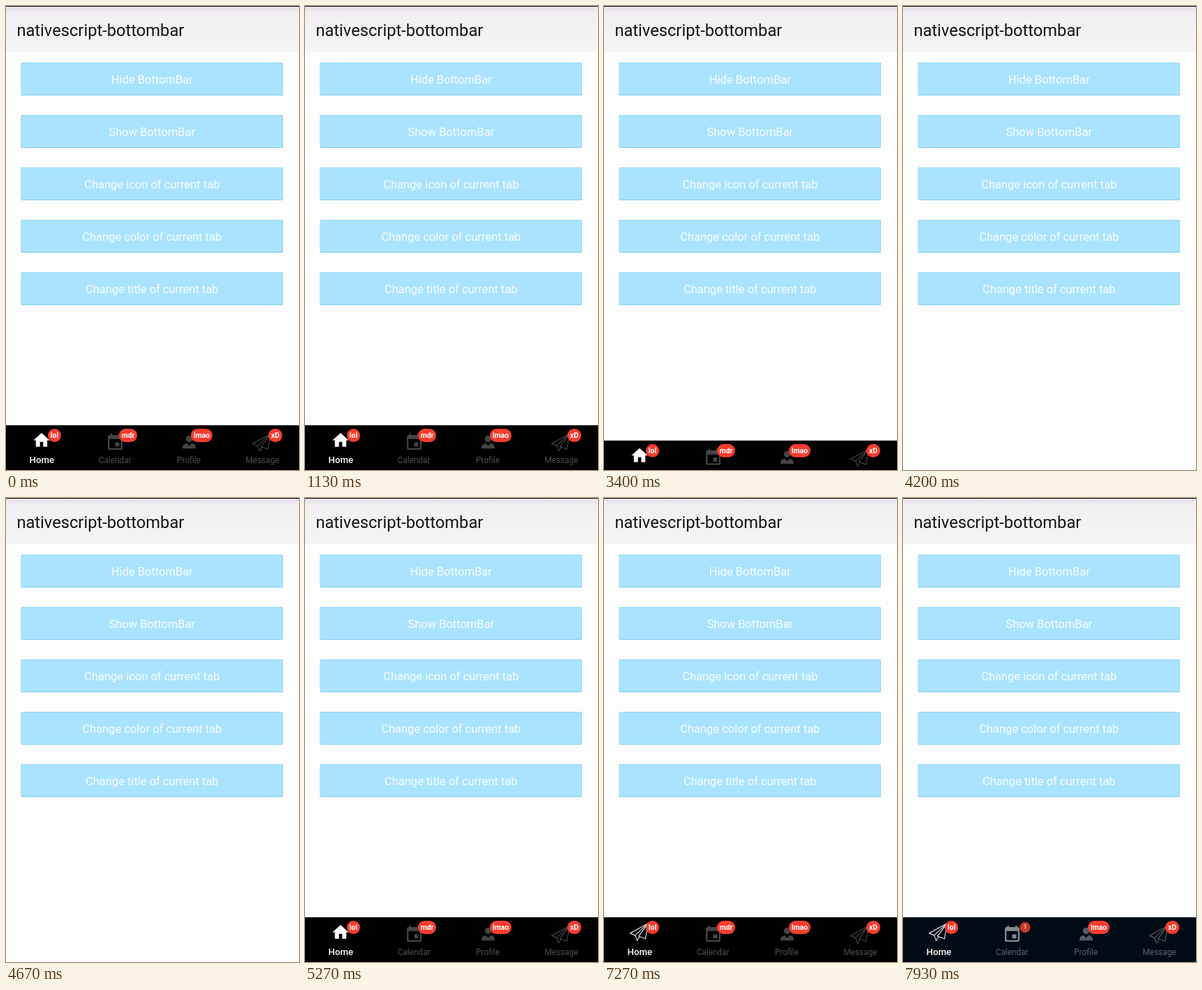
An HTML page for the animation above (8000 ms loop, 420 px wide and 664 px high).

```html
<!DOCTYPE html>
<html lang="en">
<head>
<meta charset="utf-8">
<title>Bottom bar demo</title>
<style>
  html, body { margin: 0; width: 100%; height: 100%; overflow: hidden; background: #fdfdfd; }
  svg { display: block; width: 420px; height: 664px; font-family: Roboto, sans-serif; }
</style>
</head>
<body>
<svg id="stage" viewBox="0 0 420 664" xmlns="http://www.w3.org/2000/svg">
  <defs>
    <linearGradient id="head" x1="0" y1="0" x2="0" y2="1">
      <stop offset="0" stop-color="#e4dde6"/>
      <stop offset=".16" stop-color="#f1eff2"/>
      <stop offset="1" stop-color="#f5f5f5"/>
    </linearGradient>
  </defs>
  <rect width="420" height="664" fill="#fdfdfd"/>
  <rect width="420" height="66" fill="url(#head)"/>
  <rect width="420" height="1" fill="#111"/>
  <text x="15.4" y="43" font-size="23.7" fill="#141414">nativescript-bottombar</text>
  <g id="buttons" font-size="16.5" text-anchor="middle"></g>
  <g id="bar">
    <rect id="barBg" y="600" width="420" height="64"/>
    <g id="tabs" text-anchor="middle"></g>
    <g id="badges" text-anchor="middle" font-weight="700" font-size="10.4" fill="#fff"></g>
  </g>
</svg>
<script>
const LOOP = 8000, STEP = 200 / 3;
const HIDE = 3365, SHOW = 4720, SWAP = 6301, COUNT = 7901;
const BAR_HEIGHT = 64, SLIDE = 300, POP = 150;

const $ = id => document.getElementById(id);

function add(parent, tag, attrs, text) {
  const el = document.createElementNS('http://www.w3.org/2000/svg', tag);
  set(el, attrs);
  if (text) el.textContent = text;
  parent.appendChild(el);
  return el;
}

function set(el, attrs) {
  for (const key in attrs) el.setAttribute(key, attrs[key]);
}

const clamp = v => Math.max(0, Math.min(1, v));

// cubic-bezier(0, 0, .2, 1), solved by bisection
function slowIn(x) {
  let lo = 0, hi = 1;
  for (let i = 0; i < 24; i++) {
    const s = (lo + hi) / 2;
    if (0.6 * s * s * (1 - s) + s ** 3 < x) lo = s; else hi = s;
  }
  return 3 * lo * lo * (1 - lo) + lo ** 3;
}

function overshoot(x) {
  const o = clamp(x) - 1;
  return o * o * (3 * o + 2) + 1;
}

const icons = {
  home: 'M10 20v-6h4v6h5v-8h3L12 3 2 12h3v8z',
  calendar: 'M17 12h-5v5h5v-5zM16 1v2H8V1H6v2H5c-1.11 0-1.99.9-1.99 2L3 19c0 1.1.89 2 2 2h14c1.1 0 2-.9 2-2V5c0-1.1-.9-2-2-2h-1V1h-2zm3 18H5V8h14v11z',
  person: 'M12 4a4 4 0 1 0 0 8 4 4 0 0 0 0-8zM9 13.6c-2.6.6-5 2-5 4.4v2h16v-2c0-2.4-2.4-3.8-5-4.4l-3 3.2z',
  plane: 'M23.2 1.2L.8 13.6l6.2 2.6L23.2 1.2 19.6 20.4l-8.4-3.2L23.2 1.2M7 16.2l2.4 6.4 3.2-4.8'
};

['Hide BottomBar', 'Show BottomBar', 'Change icon of current tab',
 'Change color of current tab', 'Change title of current tab'].forEach((label, i) => {
  const y = 81 + 75 * i;
  add($('buttons'), 'rect', { x: 21.5, y, width: 375.5, height: 47, rx: 1.5, fill: '#84cdf0' });
  add($('buttons'), 'rect', { x: 22, y: y + .6, width: 374.5, height: 45.4, rx: 1.5, fill: '#aae3ff' });
  add($('buttons'), 'text', { x: 209.3, y: y + 30, fill: '#f8fdff' }, label);
});

function addIcon(name, x, y) {
  const line = name === 'plane';
  const el = add($('tabs'), 'path', {
    d: icons[name], transform: `translate(${x} ${y}) scale(1.167)`,
    'stroke-width': 1, 'stroke-linejoin': 'round'
  });
  el.paint = color => set(el, { fill: line ? 'none' : color, stroke: line ? color : 'none' });
  return el;
}

const home = addIcon('home', 37, 607.5);
const homePlane = addIcon('plane', 36.5, 607);
const idle = [addIcon('calendar', 142.5, 610.5), addIcon('person', 248.5, 610), addIcon('plane', 352.5, 610.5)];

add($('tabs'), 'text', { x: 51.4, y: 654.2, 'font-size': 13.3, 'font-weight': 500, fill: '#fff' }, 'Home');
const labels = [['Calendar', 156.2], ['Profile', 262], ['Message', 367.5]].map(([label, x]) =>
  add($('tabs'), 'text', { x, y: 654, 'font-size': 11.85 }, label));

const badges = [['lol', 69.5, 19], ['mdr', 175, 26], ['lmao', 280.5, 31], ['xD', 386, 20]].map(([label, x, w]) => {
  const g = add($('badges'), 'g', {});
  const pill = add(g, 'rect', { x: -w / 2, y: -9.5, width: w, height: 19, rx: 9.5, fill: '#f93d2e' });
  const text = add(g, 'text', { y: 3.6 }, label);
  return { g, pill, text, label, x, w };
});

function setBadge(badge, label, w, scale) {
  badge.text.textContent = label;
  set(badge.pill, { x: -w / 2, width: w });
  set(badge.g, {
    transform: `translate(${badge.x} 614.5) scale(${scale})`,
    opacity: clamp(scale + .05)
  });
}

function barOffset(t) {
  if (t < SHOW) return BAR_HEIGHT * slowIn(clamp((t - HIDE) / SLIDE));
  return BAR_HEIGHT * (1 - slowIn(clamp((t - SHOW) / SLIDE)));
}

function draw(t) {
  const swapped = t >= SWAP, counted = t >= COUNT;
  set($('bar'), { transform: `translate(0 ${barOffset(t).toFixed(2)})` });
  set($('barBg'), { fill: counted ? '#000b15' : '#000' });

  home.style.display = swapped ? 'none' : '';
  homePlane.style.display = swapped ? '' : 'none';
  home.paint('#fff');
  homePlane.paint('#e2e2e2');
  idle.forEach((icon, i) => icon.paint(counted ? (i ? '#555b62' : '#858a8e') : '#444'));
  labels.forEach(label => set(label, { fill: counted ? '#5c636a' : '#505050' }));

  const pop = swapped ? overshoot((t - SWAP) / POP) : 1;
  badges.forEach((badge, i) => {
    if (i === 1 && counted) setBadge(badge, '1', 19, overshoot((t - COUNT) / POP));
    else setBadge(badge, badge.label, badge.w, pop);
  });
}

function tick() {
  const t = performance.now() % LOOP;
  draw(Math.floor((t + 4) / STEP) * STEP);
  requestAnimationFrame(tick);
}
tick();
</script>
</body>
</html>
```
